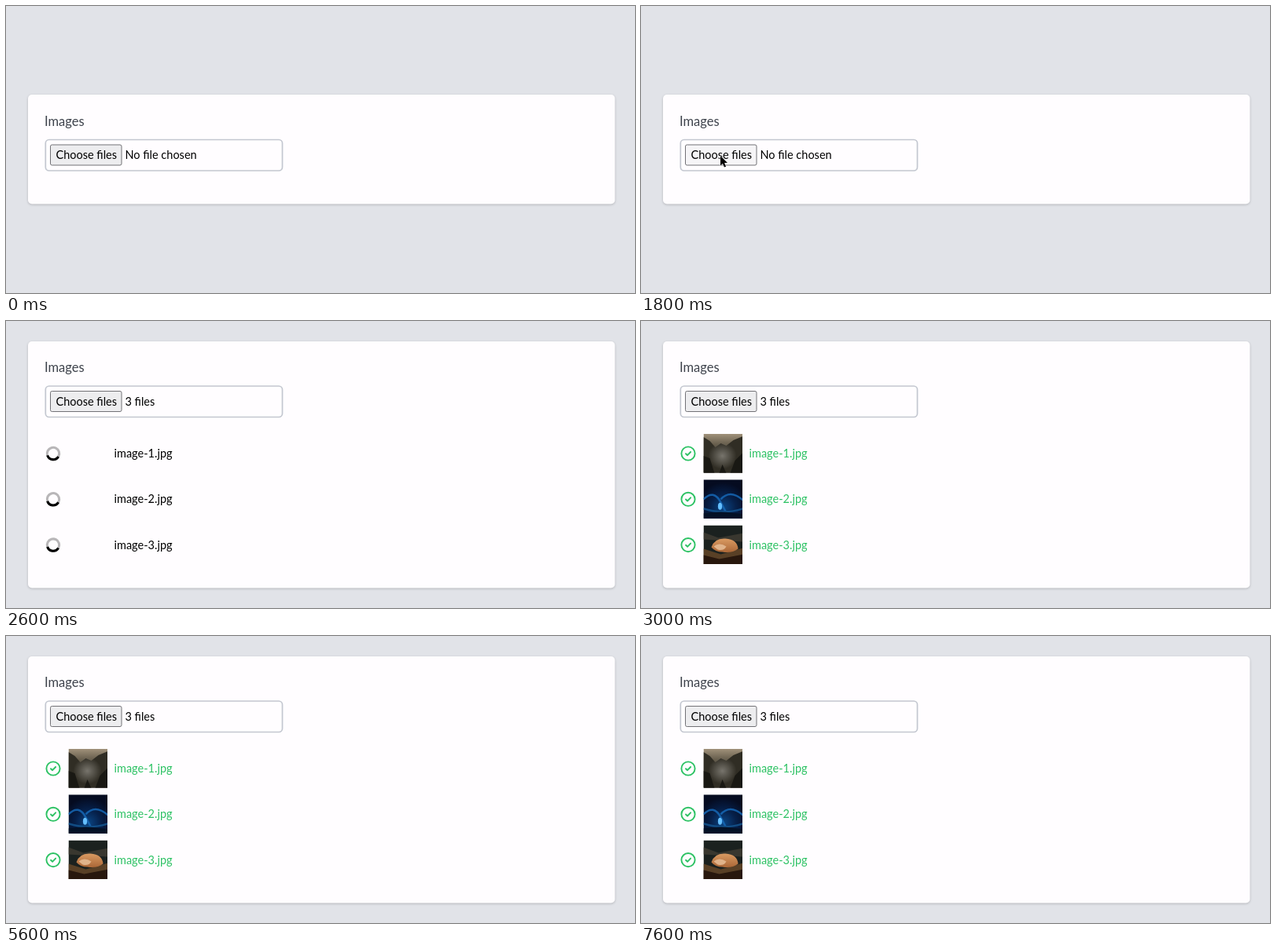
Animation, 800 px wide and 366 px high, one loop 7700 ms. Source, as an HTML page:

```html
<!DOCTYPE html>
<html lang="en">
<head>
<meta charset="utf-8">
<title>Image upload</title>
<style>
  html, body { margin: 0; width: 100%; height: 100%; overflow: hidden; background: #e1e3e8; }
  svg { display: block; width: 800px; height: 366px; font: 14.5px Lato, sans-serif; }
  #card { fill: #fffdff; filter: drop-shadow(0 1px 1.5px #0003); }
  .drag { font: 500 10.6px Inter, sans-serif; fill: #fff; }
  .done { fill: #2dc264; }
  .tick { fill: none; stroke: #2dc264; stroke-width: 1.9; stroke-linecap: round; stroke-linejoin: round; }
</style>
</head>
<body>
<svg viewBox="0 0 800 366">
  <defs>
    <linearGradient id="sky" x2="0" y2="1">
      <stop stop-color="#a0917a"/><stop offset=".4" stop-color="#4a4436"/><stop offset="1" stop-color="#1c1a16"/>
    </linearGradient>
    <radialGradient id="mist">
      <stop stop-color="#77746c"/><stop offset="1" stop-color="#77746c" stop-opacity="0"/>
    </radialGradient>
    <radialGradient id="night" cy=".72" r=".65">
      <stop stop-color="#0b4583"/><stop offset=".5" stop-color="#06204a"/><stop offset="1" stop-color="#050b20"/>
    </radialGradient>
    <linearGradient id="fur" x2="0" y2="1">
      <stop stop-color="#d99a62"/><stop offset="1" stop-color="#ab6737"/>
    </linearGradient>
    <clipPath id="thumb"><path d="M0 0H49.5V49.5H0Z"/></clipPath>
  </defs>

  <rect id="card" x="28" width="746.5" rx="5"/>
  <g id="form">
    <text x="49" y="65" font-size="16.5" fill="#3d424b">Images</text>
    <rect x="50.3" y="83" width="301.2" height="39.5" rx="4.5" fill="none" stroke="#c3c7d0" stroke-width="1.7"/>
    <rect id="button" x="56.5" y="89.5" width="90.5" height="26" rx="2" stroke="#727276"/>
    <text x="63.5" y="107.7">Choose files</text>
    <text id="status" x="151.5" y="107.7"></text>
  </g>
  <g id="list"></g>
  <g id="pointer">
    <g id="ghost" class="drag"></g>
    <path d="M0 0V12.5L2.9 9.9 4.9 14.6 7.1 13.7 5.1 9.1H9Z" stroke="#fff" stroke-width="1" paint-order="stroke"/>
    <g id="badge" class="drag" font-size="11" text-anchor="middle">
      <circle cx="8.5" cy="20.5" r="7.8" fill="#249a27"/>
      <path d="M4.3 20.5h8.4M8.5 16.3v8.4" stroke="#fff" stroke-width="1.9"/>
      <circle cx="22.5" cy="20.5" r="7.8" fill="#f02a2c"/>
      <text x="22.5" y="24.4" font-weight="700">3</text>
    </g>
  </g>
</svg>
<script>
const LOOP = 7700, STEP = 100, DROP = 1700, LISTED = 1900, DONE = 2700;
const $ = id => document.getElementById(id);
const show = (el, on) => el.setAttribute('display', on ? 'inline' : 'none');

const thumbs = [
  `<path fill="url(#sky)" d="M0 0H50V50H0Z"/>
   <path fill="#302d24" d="M0 4L8 9 15 17 22 12 29 15 38 8 50 3V50H0Z"/>
   <ellipse cx="24" cy="28" rx="18" ry="17" fill="url(#mist)"/>
   <path fill="#191813" d="M0 28L8 31 14 50H0ZM50 24L40 34 34 50H50ZM20 50L24 39 29 50Z"/>`,
  `<path fill="url(#night)" d="M0 0H50V50H0Z"/>
   <g fill="none" stroke="#1768b5" stroke-width="2.5" opacity=".85">
     <path d="M0 25Q13 12 22 29T27 39"/><path d="M22 25Q34 12 50 26"/>
     <path d="M0 37Q25 45 50 37" stroke="#14558f"/>
   </g>
   <path fill="#041126" d="M0 43Q25 39 50 44V50H0Z"/>
   <ellipse cx="21" cy="34" rx="2.6" ry="4.5" fill="#65bfff"/>`,
  `<path fill="#1b211f" d="M0 0H50V50H0Z"/>
   <path fill="#39372f" d="M0 9L19 16 50 10V21L0 18Z"/>
   <path fill="#594026" d="M0 30L22 37 50 29V38L16 50H0Z"/>
   <path fill="#28170d" d="M0 38L20 43 50 37V50H0Z"/>
   <path fill="url(#fur)" d="M10 28Q14 16 28 17 43 18 44 30 36 36 24 34 15 34 10 28Z"/>
   <path fill="#e0b38a" d="M13 27Q20 21 29 27 26 33 18 31Z"/>`
];

const files = thumbs.map((art, i) => {
  const name = `image-${i + 1}.jpg`, y = 169 + i * 58.3, dragY = -20 + i * 19.4;
  $('list').innerHTML += `<g transform="translate(60 ${y})">
    <g class="spinner">
      <g fill="none" stroke="#000" stroke-width="4" transform="scale(.77)">
        <circle r="10" opacity=".28"/><path d="M0-10A10 10 0 0 0-7.5 6.6"/>
      </g>
    </g>
    <g class="preview">
      <g class="tick"><circle r="8.6"/><path d="M-3 .2L-.9 2.2 3.1-2"/></g>
      <g transform="translate(19.5 -25)" clip-path="url(#thumb)">${art}</g>
    </g>
    <text class="name" x="77.5" y="5">${name}</text></g>`;
  $('ghost').innerHTML += `<g transform="translate(0 ${dragY})">
    <g style="filter:drop-shadow(0 2px 4px #0003)">
      <rect x="${i ? -36.5 : -37.5}" y="${i ? -5.5 : -4}" width="${i ? 8 : 9.5}" height="${i ? 12 : 9}" fill="#dedee0"/>
    </g>
    <path d="${i ? 'M-35.5-4h6v9h-6Z' : 'M-36-2.5h6.5v6h-6.5Z'}" fill="${['#38362f', '#07306b', '#33302b'][i]}"/>
    <rect x="-24" y="-6.7" width="${i ? 71 : 69.5}" height="13.4" rx="6.7" fill="#1259c8"/>
    <text x="-21" y="3.6">${name}</text></g>`;
});

// Pointer stops: time, x, y
const stops = [
  [1100, 26, 226], [1200, 78, 185], [1300, 92, 184], [1400, 98, 188],
  [1600, 101, 191], [2200, 101, 191], [2500, -20, 240]
];

function pointerAt(t) {
  const i = stops.findIndex(s => s[0] > t);
  if (i < 1) return null;
  const [t0, x0, y0] = stops[i - 1], [t1, x1, y1] = stops[i];
  const k = (t - t0) / (t1 - t0);
  return [x0 + (x1 - x0) * k, y0 + (y1 - y0) * k];
}

function draw(t) {
  const listed = t >= LISTED, done = t >= DONE, dragging = t < DROP;
  $('card').setAttribute('y', listed ? 26 : 113);
  $('card').setAttribute('height', listed ? 314.5 : 139.5);
  $('form').setAttribute('transform', `translate(0 ${listed ? 0 : 87.5})`);
  $('status').textContent = listed ? '3 files' : 'No file chosen';
  $('button').setAttribute('fill', !dragging && !listed ? '#f6f5f7' : '#ededef');

  show($('list'), listed);
  document.querySelectorAll('.spinner').forEach(el => {
    show(el, !done);
    el.setAttribute('transform', `rotate(${(t - LISTED) * .36})`);
  });
  document.querySelectorAll('.preview').forEach(el => show(el, done));
  document.querySelectorAll('.name').forEach(el => el.classList.toggle('done', done));

  const at = pointerAt(t);
  show($('pointer'), at);
  if (at) $('pointer').setAttribute('transform', `translate(${at})`);
  show($('ghost'), dragging);
  show($('badge'), dragging);
}

const start = performance.now();
function tick() {
  const t = (performance.now() - start) % LOOP;
  draw(Math.floor(t / STEP) * STEP);
  requestAnimationFrame(tick);
}
tick();
</script>
</body>
</html>
```
